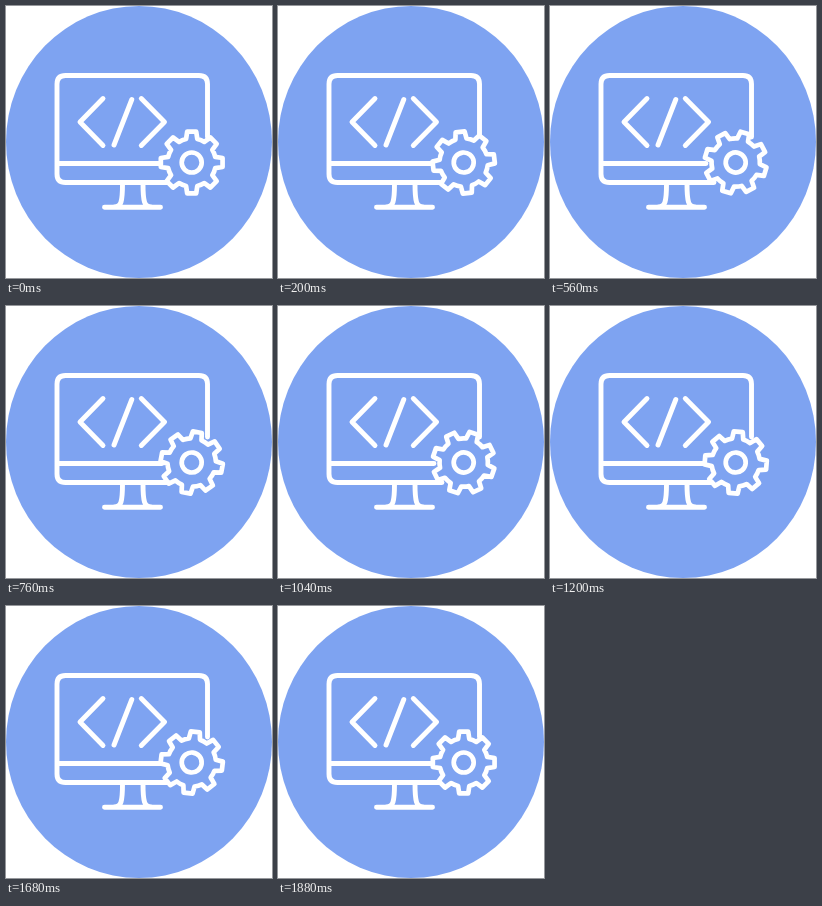
Animation, 266 px wide and 272 px high, one loop 1.92 s. Source, as an HTML page:

```html
<!DOCTYPE html>
<html lang="en">
<head>
<meta charset="utf-8">
<title>Development icon</title>
<style>
  html, body { margin: 0; width: 100%; height: 100%; overflow: hidden; background: #fff; }
  svg { display: block; width: 266px; height: 272px; }
  .line { fill: none; stroke: #fff; stroke-width: 4.9; stroke-linecap: round; stroke-linejoin: round; }
  #gear { fill: #7ea3f1; stroke-width: 4.7; }
</style>
</head>
<body>
<svg viewBox="0 0 266 272">
  <ellipse cx="133" cy="136" rx="133" ry="136" fill="#7ea3f1"/>
  <g class="line">
    <!-- monitor and stand -->
    <path d="M201.5 131V78Q201.5 69.5 193 69.5H59.5Q51 69.5 51 78V168Q51 176.5 59.5 176.5H164M51 157.5H156"/>
    <path d="M116.5 178Q116.5 191 115 196Q113.5 201 108 201M137 178Q137 191 138.5 196Q140 201 145.5 201M98.5 201.3H154.5"/>
    <!-- code symbol -->
    <path d="M97 92.5L74 116L97 139.5M125.8 93.5L108 139M135.3 92.5L158.5 116L135.3 139.5"/>
  </g>
  <g id="gear" class="line">
    <path id="teeth"/>
    <circle r="10"/>
  </g>
</svg>
<script>
const LOOP = 1920, STEP = 40, TEETH = 8;
const ROOT = 24.2, TIP = 31.2;
const LAST = LOOP / STEP - 1; // the full turn ends on the last step
const gear = document.getElementById('gear');

const point = (radius, side, angle) => {
  const a = angle + Math.asin(side / radius);
  return `${(radius * Math.sin(a)).toFixed(2)} ${(-radius * Math.cos(a)).toFixed(2)}`;
};

let outline = '';
for (let i = 0; i < TEETH; i++) {
  const a = i * 2 * Math.PI / TEETH;
  const root = point(ROOT, -5.6, a);
  outline += i ? `A${ROOT} ${ROOT} 0 0 1 ${root}` : `M${root}`;
  outline += `L${point(TIP, -4.5, a)}L${point(TIP, 4.5, a)}L${point(ROOT, 5.6, a)}`;
}
outline += `A${ROOT} ${ROOT} 0 0 1 ${point(ROOT, -5.6, 0)}Z`;
document.getElementById('teeth').setAttribute('d', outline);

const start = performance.now();
function draw() {
  const time = (performance.now() - start) % LOOP;
  const turn = Math.floor(time / STEP) / LAST * 360;
  gear.setAttribute('transform', `translate(185.7 156.5) rotate(${turn})`);
  requestAnimationFrame(draw);
}
draw();
</script>
</body>
</html>
```
